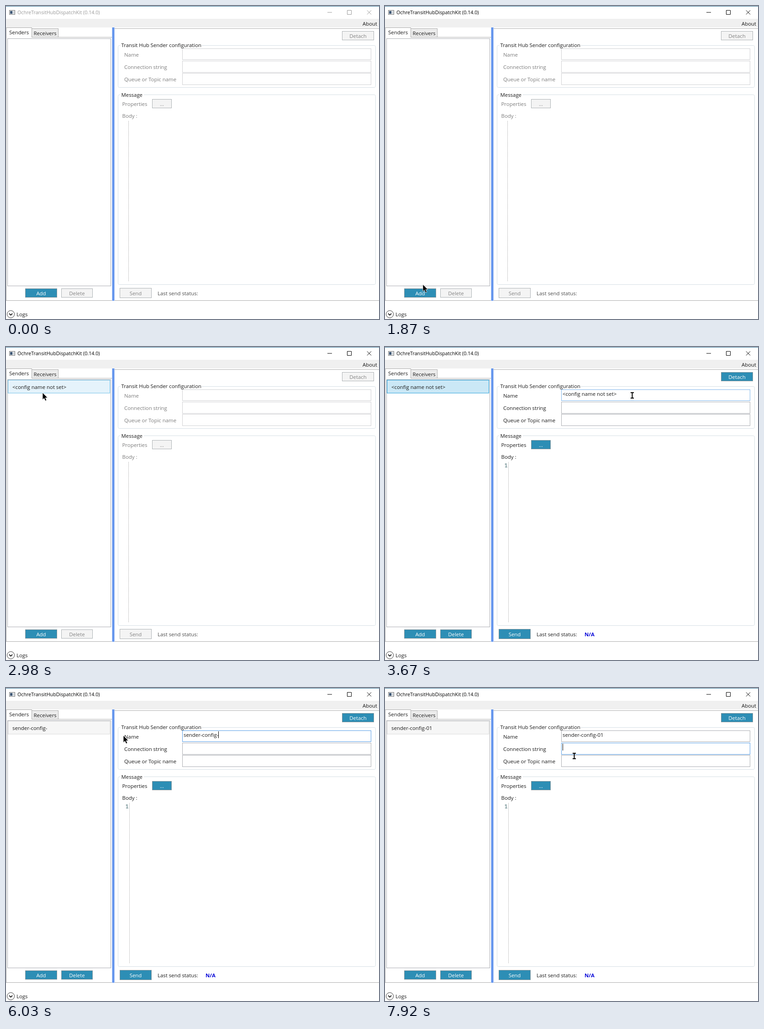
Recreate the animation shown at these times as an HTML page. Size 817 px wide and 686 px high, loop 7990 ms.

```html
<!DOCTYPE html>
<html lang="en">
<head>
<meta charset="utf-8">
<title>Message sender window</title>
<style>
  html, body { margin: 0; width: 100%; height: 100%; overflow: hidden; background: #fff; }
  svg { display: block; width: 817px; height: 686px; }
  text { font: 11.4px "Open Sans", "Noto Sans", sans-serif; fill: #1a1a1a; white-space: pre; }
  .line { fill: none; stroke: #acacac; }
  .group { fill: none; stroke: #d5dfe5; }
  .title { font-size: 10.7px; fill: #999; }
  .chrome { fill: none; stroke: #999; }
  .active .title { fill: #000; }
  .active .chrome { stroke: #000; }

  .label { fill: #7c7c7c; }
  .note { fill: #4a4a4a; }
  .on .label, .on .note { fill: #1a1a1a; }
  .field { fill: #fff; stroke: #d0d1d4; }
  .on .field { stroke: #abadb3; }
  .on .field.hover { stroke: #7eb4ea; }
  .on .field.focus { stroke: #569de5; }

  .button rect { fill: #f4f4f4; stroke: #adb2b5; }
  .button text { fill: #838383; text-anchor: middle; }
  .on .button rect, .button.live rect { fill: #2d8eb5; stroke: #86949a; }
  .on .button text, .button.live text { fill: #fff; }
  .button.live.hover rect { fill: #bee6fd; stroke: #3c7fb1; }

  .item rect { fill: none; stroke: none; }
  .item.hover rect { fill: #e5f3fb; stroke: #70c0e7; }
  .item.selected rect { fill: #cbe8f6; stroke: #26a0da; }
  .item.idle rect { fill: #f6f6f6; stroke: #dadada; }

  .dots { stroke: #a0a0a0; stroke-dasharray: 1 1; }
  .on .dots { transform: translateX(2px); }
  .late { visibility: hidden; }
  .on .late { visibility: visible; }
  .status { font-weight: 700; fill: #0808d8; }
  .number { font: 600 12px "Noto Sans Mono", monospace; fill: #7f9a9d; }
</style>
</head>
<body>
<svg id="app" viewBox="0 0 817 686">
  <rect width="817" height="686" fill="#fff"/>
  <rect width="817" height="1" fill="#35759a"/>

  <!-- title bar -->
  <rect x="7.5" y="9.5" width="12" height="9" fill="#eef1f3" stroke="#777"/>
  <rect x="9" y="11" width="5" height="6" fill="#3d5674"/>
  <path d="M15.5 11v6M17.5 11v6" stroke="#b4bcc4"/>
  <text class="title" x="25" y="18">OchreTransitHubDispatchKit (0.14.0)</text>
  <path class="chrome" d="M704 14h10M747.5 9.5h9v9h-9zM791 9.5l9 9M800 9.5l-9 9"/>
  <rect y="28" width="817" height="19" fill="#f0f0f0"/>
  <text x="781" y="42.5">About</text>

  <!-- left pane -->
  <rect y="47" width="817" height="600" fill="#fff"/>
  <path class="line" d="M.5 645V47.5h56v21H232M0 645.5h232"/>
  <rect x="56.5" y="49.5" width="58" height="19" fill="#ececec" stroke="#acacac"/>
  <text x="7" y="62">Senders</text>
  <text x="60.5" y="63.5">Receivers</text>
  <rect x="3.5" y="71.5" width="226" height="542" fill="#fff" stroke="#abadb3"/>
  <g id="item" class="item">
    <rect x="4.5" y="72.5" width="223" height="28.5"/>
    <text id="itemText" x="14" y="92"></text>
  </g>

  <!-- right pane -->
  <path class="line" d="M238 49.5H817M238 645.5H817"/>
  <rect x="232.5" y="47" width="5" height="599" fill="#6495ed"/>
  <rect class="group" x="245.5" y="86.5" width="564" height="92" rx="3"/>
  <rect class="group" x="245.5" y="194.5" width="564" height="416" rx="3"/>
  <path d="M250 86.5H429M250 194.5H302" stroke="#fff" stroke-width="3"/>
  <text x="252.5" y="90">Transit Hub Sender configuration</text>
  <text x="252.5" y="199">Message</text>
  <text class="label" x="259" y="111">Name</text>
  <text class="label" x="259" y="138">Connection string</text>
  <text class="label" x="259" y="165">Queue or Topic name</text>
  <rect id="nameField" class="field" x="386.5" y="93.5" width="413" height="24"/>
  <rect id="linkField" class="field" x="386.5" y="120.5" width="413" height="25"/>
  <rect class="field" x="386.5" y="147.5" width="413" height="25"/>
  <rect id="marked" y="96" height="16" fill="#99c9ef"/>
  <text id="nameText" x="389" y="107"></text>
  <rect id="caret" width="1" height="15" fill="#000"/>
  <text class="label" x="254.5" y="219">Properties</text>
  <text class="label" x="254.5" y="244.5">Body :</text>
  <path class="dots" d="M268.5 252V604"/>
  <text class="number late" x="261.5" y="264">1</text>
  <text class="note" x="332" y="634">Last send status:</text>
  <text class="status late" x="437" y="634">N/A</text>
  <g id="buttons"></g>

  <!-- footer -->
  <circle cx="10.5" cy="675.5" r="8" fill="#fff" stroke="#333"/>
  <path d="M7 674l3.5 3.5L14 674" fill="none" stroke="#222" stroke-width="1.8"/>
  <text x="23" y="680">Logs</text>

  <!-- pointers -->
  <path id="arrow" d="M0 0V15.5L3.5 12.3 6 18 8.8 16.8 6.3 11.3H11z" fill="#000" stroke="#fff" stroke-width=".8"/>
  <path id="beam" d="M-3 -6H4M-3 6H4M.5 -6V6" fill="none" stroke="#000" stroke-width="2"/>
</svg>
<script>
const LOOP = 7990;
const ENTER = 150, ACTIVATE = 1030, ADDED = 2220, SELECT = 3110,
      FOCUS_NAME = 3740, DRAG_END = 3950, FOCUS_LINK = 7720;
const EMPTY = '<config name not set>', TYPED = 'sender-config-01';
const KEYS = [4020, 4220, 4620, 4750, 4950, 5020, 5220, 5290,
              5420, 5490, 5620, 5760, 5830, 5960, 6360, 6430];

// time, x, y of the pointer
const PATH = [
  [150, 609, 587], [370, 321, 428], [560, 89, 321], [650, 30, 262],
  [800, 50, 75], [900, 90, 60], [1030, 90, 60], [1380, 284, 408],
  [1520, 262, 440], [1870, 83, 610], [1960, 77, 625], [2360, 77, 625],
  [2500, 120, 542], [2850, 80, 100], [3180, 80, 100], [3600, 541, 106],
  [3740, 541, 106], [3950, 257, 104], [7030, 257, 104], [7600, 416, 130],
  [7790, 416, 130], [7920, 414, 149]
];

const $ = id => document.getElementById(id);
const [app, item, itemText, nameField, linkField, nameText, marked, caret, arrow, beam] =
  ['app', 'item', 'itemText', 'nameField', 'linkField', 'nameText', 'marked', 'caret', 'arrow', 'beam'].map($);

function addButton(label, x, y, w, h, extra = '') {
  $('buttons').insertAdjacentHTML('beforeend',
    `<g class="button ${extra}"><rect x="${x + .5}" y="${y + .5}" width="${w - 1}" height="${h - 1}"/>
     <text x="${x + w / 2}" y="${y + h / 2 + 4.5}">${label}</text></g>`);
  return $('buttons').lastElementChild;
}
addButton('Detach', 736, 55, 70, 20);
addButton('...', 320, 204, 43, 20);
addButton('Send', 249, 618, 70, 22);
addButton('Delete', 121, 619, 69, 20);
const add = addButton('Add', 42, 619, 70, 20, 'live');

function pointerAt(t) {
  const i = PATH.findIndex(p => p[0] > t);
  if (i < 0) return PATH[PATH.length - 1].slice(1);
  if (i === 0) return PATH[0].slice(1);
  const [t0, x0, y0] = PATH[i - 1], [t1, x1, y1] = PATH[i];
  const k = (t - t0) / (t1 - t0);
  return [x0 + (x1 - x0) * k, y0 + (y1 - y0) * k];
}

const show = (el, on) => el.setAttribute('visibility', on ? 'visible' : 'hidden');
const within = (x, y, l, t, r, b) => x >= l && x < r && y >= t && y < b;

function setText(el, value) {
  if (el.textContent !== value) el.textContent = value;
}

function draw(t) {
  const [x, y] = pointerAt(t);
  const enabled = t >= SELECT;
  const typed = KEYS.filter(k => k <= t).length;
  const name = typed ? TYPED.slice(0, typed) : EMPTY;
  const onName = t >= FOCUS_NAME && t < FOCUS_LINK, onLink = t >= FOCUS_LINK;

  app.classList.toggle('active', t >= ACTIVATE);
  app.classList.toggle('on', enabled);
  add.classList.toggle('hover', t >= ENTER && within(x, y, 42, 619, 112, 639));

  const overItem = t >= ADDED && within(x, y, 4, 72, 228, 101);
  item.setAttribute('class', 'item ' +
    (t >= FOCUS_NAME ? 'idle' : enabled ? 'selected' : overItem ? 'hover' : ''));
  setText(itemText, t >= ADDED ? name : '');
  setText(nameText, enabled ? name : '');

  nameField.classList.toggle('focus', onName);
  nameField.classList.toggle('hover', within(x, y, 386, 93, 800, 118));
  linkField.classList.toggle('focus', onLink);
  linkField.classList.toggle('hover', within(x, y, 386, 120, 800, 146));

  const end = 389 + (enabled ? nameText.getComputedTextLength() : 0);
  const selecting = onName && !typed;
  const from = Math.min(end, Math.max(389, x));
  show(marked, selecting);
  marked.setAttribute('x', from);
  marked.setAttribute('width', end - from);
  show(caret, onName || onLink);
  caret.setAttribute('x', Math.round(onLink ? 389 : selecting ? from : end));
  caret.setAttribute('y', onLink ? 122 : 95);

  const dragging = t >= FOCUS_NAME && t < DRAG_END;
  const textual = dragging || enabled && within(x, y, 386, 93, 800, 173);
  const place = `translate(${x.toFixed(1)} ${y.toFixed(1)})`;
  arrow.setAttribute('transform', place);
  beam.setAttribute('transform', place);
  show(arrow, t >= ENTER && !textual);
  show(beam, textual);
}

const start = performance.now();
function tick() {
  draw((performance.now() - start) % LOOP);
  requestAnimationFrame(tick);
}
tick();
</script>
</body>
</html>
```
